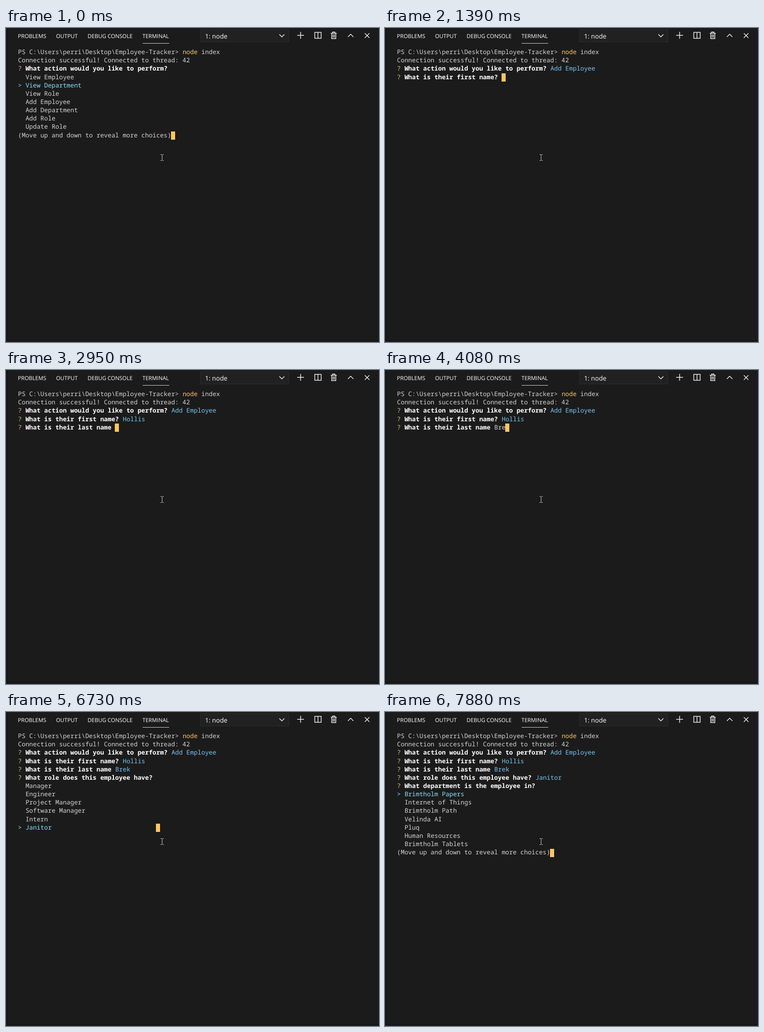
An HTML page for the animation above (8 s loop, 816x686 px).

```html
<!DOCTYPE html>
<html lang="en">
<head>
<meta charset="utf-8">
<title>Employee tracker terminal</title>
<style>
  html, body { margin: 0; width: 100%; height: 100%; overflow: hidden; background: #1b1b1b; }
  svg { display: block; text-rendering: geometricPrecision; }
  .tabs { font: 500 12px "Open Sans", sans-serif; fill: #ffffff; }
  .pick { font: 500 14px "Open Sans", sans-serif; fill: #ffffff; }
  .icons { fill: none; stroke: #f4f4f4; stroke-width: 1.5; }
  #screen { font: 500 13.64px "Noto Sans Mono", "DejaVu Sans Mono", monospace; }
  .plain { fill: #d4d4d4; }
  .mark { fill: #d6c678; }
  .ask { fill: #ffffff; font-weight: bold; }
  .answer { fill: #78c6f2; }
  .active { fill: #8ae0ff; }
  .command, .cursor { fill: #ffc663; }
</style>
</head>
<body>
<svg width="816" height="686" viewBox="0 0 816 686">
  <rect width="816" height="686" fill="#1b1b1b"/>
  <path d="M3.5 0V682M3 682.5H816" stroke="#101010" fill="none"/>
  <g class="tabs">
    <text x="26" y="21.5">PROBLEMS</text>
    <text x="109.5" y="21.5">OUTPUT</text>
    <text x="178.5" y="21.5">DEBUG CONSOLE</text>
    <text x="298.5" y="21.5">TERMINAL</text>
  </g>
  <path d="M299 33.5H357" stroke="#d8d8d8"/>
  <rect x="425.5" y="3.5" width="193" height="27" fill="#212121" stroke="#2e2e2e"/>
  <text class="pick" x="435.5" y="23.3">1: node</text>
  <g class="icons">
    <path d="M598 14l5.5 5.5 5.5-5.5"/>
    <path d="M637 16H652M644.5 8.5V23.5"/>
    <path d="M675.5 9.5H689.5V22.5H675.5ZM682.5 9.5V22.5"/>
    <path d="M710.5 11.5H723.5M714.5 11V8.8H719.5V11M712.5 12V23.3H721.5V12M715.5 14V21M718.5 14V21"/>
    <path d="M748 19.5l6-6 6 6"/>
    <path d="M785 11.5l10 10M795 11.5l-10 10"/>
  </g>
  <g id="screen"></g>
  <path d="M338 276.5H340.5L341.5 277.5 342.5 276.5H345M341.5 277V288.5M338 289.5H340.5L341.5 288.5 342.5 289.5H345"
        fill="none" stroke="#d8d8d8"/>
</svg>
<script>
const LEFT = 26.3, TOP = 44.6, CELL = 8.185, ROW = 18.15, LOOP = 8000;
const FIRST = 'Hollis', LAST = 'Brek';
const HINT = '(Use arrow keys)';
const MORE = [['plain', '(Move up and down to reveal more choices)']];

const ask = (question, text = '', kind = 'plain') =>
  [['mark', '? '], ['ask', question + ' '], [kind, text]];
const list = (items, active) => items.map((item, i) =>
  i === active ? [['active', '> ' + item]] : [['plain', '  ' + item]]);

const header = [
  [['plain', 'PS C:\\Users\\perri\\Desktop\\Employee-Tracker> '], ['command', 'node'], ['plain', ' index']],
  [['plain', 'Connection successful! Connected to thread: 42']]
];
const actions = ['View Employee', 'View Department', 'View Role', 'Add Employee',
  'Add Department', 'Add Role', 'Update Role'];
const roles = ['Manager', 'Engineer', 'Project Manager', 'Software Manager', 'Intern', 'Janitor'];
const departments = ['Brimtholm Papers', 'Internet of Things', 'Brimtholm Path', 'Velinda AI',
  'Pluq', 'Human Resources', 'Brimtholm Tablets', 'Customer Support'];

const askAction = 'What action would you like to perform?';
const askFirst = 'What is their first name?';
const askLast = 'What is their last name';
const askRole = 'What role does this employee have?';
const askDepartment = 'What department is the employee in?';

const width = line => line.reduce((sum, run) => sum + run[1].length, 0);
const scene = (lines, column) => {
  const all = [...header, ...lines];
  return { lines: all, column: column ?? width(all[all.length - 1]) };
};

const chosen = ask(askAction, 'Add Employee', 'answer');
const named = [chosen, ask(askFirst, FIRST, 'answer')];
const fullName = [...named, ask(askLast, LAST, 'answer')];

const menu = active => scene([ask(askAction), ...list(actions, active), MORE]);
const typeFirst = n => scene([chosen, ask(askFirst, FIRST.slice(0, n))]);
const typeLast = n => scene([...named, ask(askLast, LAST.slice(0, n))]);
const pickRole = (hint, active) => {
  const prompt = ask(askRole, hint);
  return scene([...fullName, prompt, ...list(roles, active)], width(prompt));
};
const pickDepartment = (hint, start) => {
  const prompt = ask(askDepartment, hint);
  return scene([...fullName, ask(askRole, 'Janitor', 'answer'), prompt,
    ...list(departments.slice(start, start + 7), 0), MORE], Math.max(width(prompt), width(MORE)));
};

const timeline = [
  [0, menu(1)], [800, menu(2)], [1010, menu(3)],
  [1390, typeFirst(0)], [2170, typeFirst(1)], [2250, typeFirst(2)], [2330, typeFirst(3)],
  [2480, typeFirst(4)], [2560, typeFirst(5)], [2640, typeFirst(6)],
  [2950, typeLast(0)], [3350, typeLast(1)], [3620, typeLast(2)], [4080, typeLast(3)], [5010, typeLast(4)],
  [5240, pickRole(HINT, 0)], [6730, pickRole('', 5)],
  [7190, pickDepartment(HINT, 1)], [7880, pickDepartment('', 0)]
];

function drawLine(line, row) {
  let column = 0;
  return line.map(([kind, text]) => {
    const indent = text.length - text.trimStart().length;
    const x = LEFT + (column + indent) * CELL;
    column += text.length;
    return `<text class="${kind}" x="${x}" y="${TOP + 12.5 + row * ROW}">${text.trim().replace('>', '&gt;')}</text>`;
  }).join('');
}

const screenGroup = document.getElementById('screen');
let shown;

function frame() {
  const time = performance.now() % LOOP;
  const current = timeline.findLast(([start]) => start <= time)[1];
  if (current !== shown) {
    shown = current;
    const { lines, column } = current;
    const right = Math.round(LEFT + (column + 1) * CELL);
    const y = Math.round(TOP + (lines.length - 1) * ROW);
    screenGroup.innerHTML = lines.map(drawLine).join('') +
      `<rect class="cursor" x="${right - 9}" y="${y}" width="9" height="18"/>`;
  }
  requestAnimationFrame(frame);
}
frame();
</script>
</body>
</html>
```
